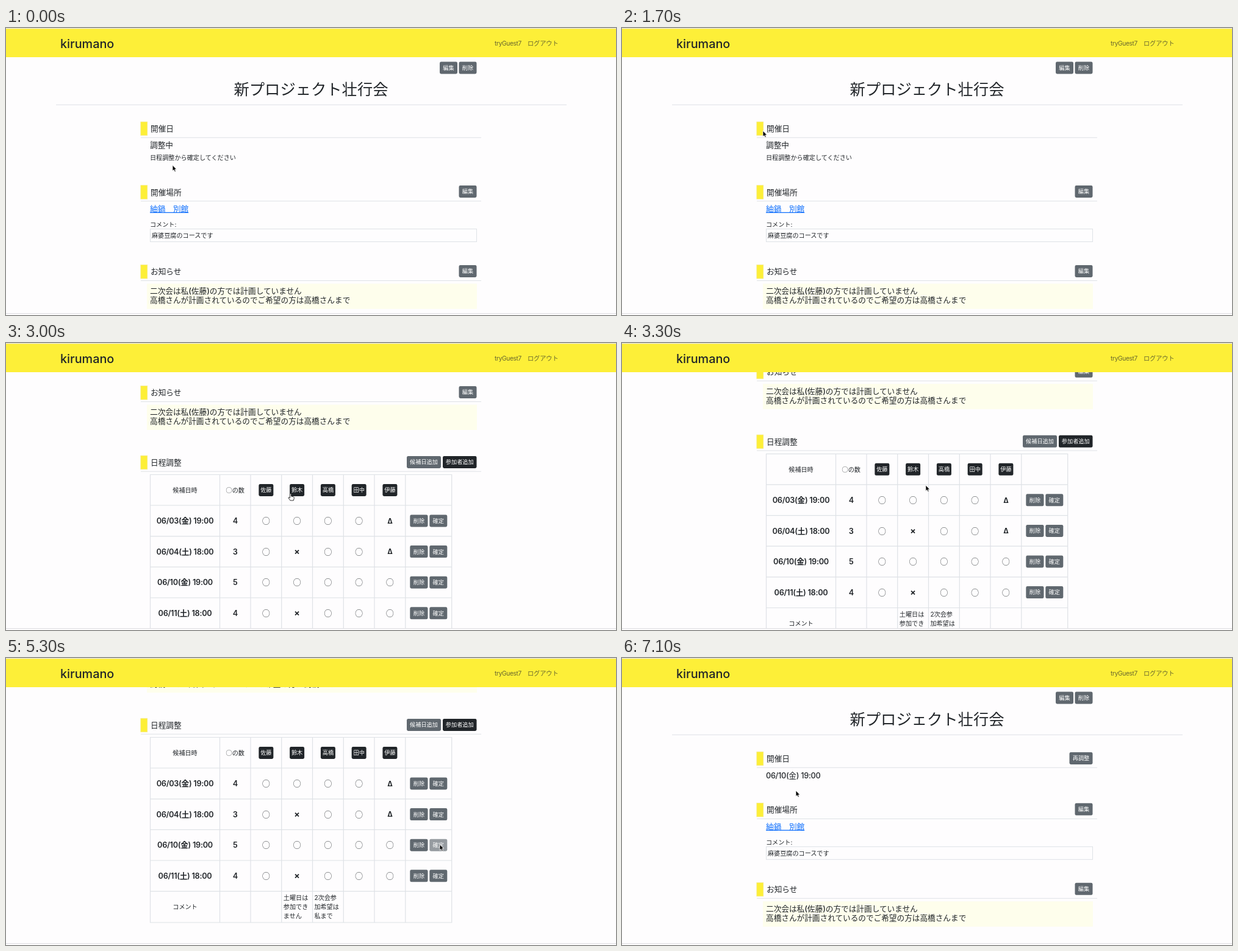
An HTML page that plays this animation: 1000x472 px, repeating every 7200 ms.

```html
<!DOCTYPE html>
<html lang="ja">
<meta charset="utf-8">
<title>日程調整</title>
<style>
html, body { margin: 0; width: 100%; height: 100%; overflow: hidden; background: #fefdfe }
svg { display: block; width: 100%; height: 100% }
text { font-family: Inter, "Noto Sans CJK JP", "Noto Sans CJK", sans-serif; white-space: pre }
.ring { font-family: "Noto Sans CJK JP", "Noto Sans CJK", sans-serif }
</style>
<svg id="stage" viewBox="0 0 1000 472"></svg>
<script>
const INK = '#212529', GRAY = '#60686f', LINE = '#dee2e6', YELLOW = '#fdef38';
const S = 10.12, M = 12.65;

const rect = (x, y, w, h, fill, more = '') =>
  `<rect x="${x}" y="${y}" width="${w}" height="${h}" fill="${fill}" ${more}/>`;
// Text is placed by its vertical middle.
const text = (s, x, mid, size = M, more = '') =>
  `<text x="${x}" y="${mid + size * .37}" font-size="${size}" fill="${INK}" ${more}>${s}</text>`;
const centered = (s, x, mid, size, more = '') => text(s, x, mid, size, 'text-anchor="middle" ' + more);
const rule = (x1, x2, y) => rect(x1, y - .5, x2 - x1, 1, LINE);
const button = (s, x, w, mid, fill = GRAY, id = '') =>
  `<g ${id && `id="${id}"`}>` + rect(x, mid - 10, w, 20, fill, 'rx="2.4"') +
  centered(s, x + w / 2, mid, 9.2, 'style="fill:#fff" font-weight="500"') + '</g>';
const heading = (s, mid) =>
  rect(220.8, mid - 11.3, 11, 22.6, YELLOW, 'stroke="#f3ea98" stroke-width=".7"') +
  text(s, 237, mid) + rule(221, 779, mid + 14.7);

const title = () =>
  button('編集', 711, 29, 65.5) + button('削除', 742.5, 29, 65.5) +
  centered('新プロジェクト壮行会', 500, 100.5, 25.3) +
  rule(82, 919, 126.3) + heading('開催日', 165.5);

const details = () =>
  heading('開催場所', 270) + button('編集', 742.5, 29, 269) +
  text('紬鍋　別館', 236, 297.2, M, 'style="fill:#0d6efd" text-decoration="underline"') +
  text('コメント:', 236, 323, S) +
  rect(236.5, 330.5, 535, 21, 'none', `stroke="${LINE}"`) +
  text('麻婆豆腐のコースです', 239, 341.2, S) +
  heading('お知らせ', 400.8) + button('編集', 742.5, 29, 400) +
  rect(231, 420.5, 541, 41.5, '#fefeec') +
  text('二次会は私(佐藤)の方では計画していません', 236, 432.6, M, 'font-weight="500"') +
  text('高橋さんが計画されているのでご希望の方は高橋さんまで', 236, 447.7, M, 'font-weight="500"');

function schedule() {
  const xs = [236.5, 350.5, 401, 451.7, 502.5, 553.3, 604, 654.8, 730.7];
  const ys = [535.5, 586, 636.8, 687.4, 738, 788.7, 840];
  const mid = c => (xs[c] + xs[c + 1]) / 2;
  const bold = 'font-weight="600" letter-spacing="-.25"';
  const marks = { '◯': [M, 'class="ring"'], '×': [14, 'font-weight="700"'], 'Δ': [11.5, 'font-weight="700"'] };
  let out = heading('日程調整', 515.5) +
    button('候補日追加', 657, 56, 515) + button('参加者追加', 716, 55.5, 515, INK);
  out += `<path d="${xs.map(x => `M${x} 535V840.5`).join('')}${ys.map(y => `M236 ${y}H731`).join('')}"
    stroke="${LINE}" stroke-width="1.2"/>`;
  out += centered('候補日時', mid(0), 561, S) + centered('◯の数', mid(1), 561, S, 'class="ring"');
  ['佐藤', '鈴木', '高橋', '田中', '伊藤'].forEach((n, i) =>
    out += button(n, mid(i + 2) - 12, 24, 561, INK));
  const rows = [['06/03(金) 19:00', 4, '◯◯◯◯Δ'], ['06/04(土) 18:00', 3, '◯×◯◯Δ'],
                ['06/10(金) 19:00', 5, '◯◯◯◯◯'], ['06/11(土) 18:00', 4, '◯×◯◯◯']];
  rows.forEach(([day, count, answers], r) => {
    const y = 611.5 + r * 50.6;
    out += centered(day, mid(0), y, M, bold) + centered(count, mid(1), y, M, bold);
    [...answers].forEach((m, i) => out += centered(m, mid(i + 2), y, ...marks[m]));
    out += button('削除', 662.3, 29.2, y) + button('確定', 694.3, 29, y, GRAY, 'fix' + r);
  });
  out += centered('コメント', mid(0), 814, S);
  [['土曜日は', '参加でき', 'ません'], ['2次会参', '加希望は', '私まで']].forEach((lines, c) =>
    lines.forEach((s, i) => out += text(s, 454.8 + c * 50.6, 799.2 + i * 15.2, S)));
  return out;
}

stage.innerHTML =
  `<g id="open">${title()}${text('調整中', 236, 192.7)}
    ${text('日程調整から確定してください', 236, 213.2, S)}${details()}${schedule()}</g>
  <g id="fixed">${title()}${button('再調整', 733.5, 38, 165)}
    ${text('06/10(金) 19:00', 236, 193, M, 'font-weight="500" letter-spacing="-.25"')}
    <g transform="translate(0 -20.2)">${details()}</g></g>` +
  rect(0, 0, 1000, 48, YELLOW) + rect(0, 0, 1000, 1.2, '#e9e8ec') +
  text('kirumano', 89, 25.5, 19.8, 'font-weight="500"') +
  text('tryGuest7', 801, 24.8, S, 'fill-opacity=".68" letter-spacing="-.3"') +
  text('ログアウト', 855, 24.8, S, 'fill-opacity=".68"') +
  rect(0, 469, 1000, 3, '#fefdfe') + rect(0, 469, 1000, 1, '#dcdce0') +
  `<g id="status">${rect(-2, 457, 336, 17, '#ececef', 'rx="2" stroke="#d4d4d8" stroke-width=".8"')}
    ${text('リクエストを処理しています…', 0, 464, 7.4, 'fill-opacity=".6"')}</g>
  <g id="cursor">
    <path id="arrow" d="M0 0V9.6L2.2 7.7 3.7 11 5.3 10.3 3.9 7.1H6.7Z" stroke="#fff" stroke-width=".8"/>
    <path id="hand" d="M-1 1Q0-.5 1 1V4.5L5 5.5Q6.2 6 5.8 8L4.8 11.5H-.5L-3.5 7.5Q-3.6 6-2.4 6.3L-1 7.5Z"
      fill="#fff" stroke="#222" stroke-width=".9" stroke-linejoin="round"/>
  </g>`;

const $ = id => document.getElementById(id);
const show = (id, on) => $(id).setAttribute('visibility', on ? 'visible' : 'hidden');
const opacity = (id, v) => $(id).setAttribute('opacity', v);
const move = (id, x, y) => $(id).setAttribute('transform', `translate(${x} ${y})`);

// Eased value between keys of the form [time, ...values].
function at(keys, t) {
  const i = keys.findIndex(k => k[0] > t);
  if (i < 1) return keys.at(i).slice(1);
  const a = keys[i - 1], b = keys[i];
  let u = (t - a[0]) / (b[0] - a[0]);
  u *= u * (3 - 2 * u);
  return a.slice(1).map((v, j) => v + (b[j + 1] - v) * u);
}

const scrollKeys = [[0, 0], [1900, 0], [2700, 319], [3150, 319], [3500, 405], [7200, 405]];
const cursorKeys = [[0, 273, 225.5], [600, 262, 215], [1500, 231, 169], [1900, 231, 169],
  [2900, 466.5, 247.5], [3100, 466.5, 247.5], [3600, 555, 209], [4100, 640, 255], [4800, 711, 306.5],
  [5400, 711, 306.5], [5800, 649, 268], [6800, 285, 218], [7200, 285, 218]];

function draw(now) {
  const t = now % 7200, done = t >= 5500;
  show('open', !done);
  show('fixed', done);
  move('open', 0, -at(scrollKeys, t)[0]);
  opacity('fix2', t >= 5200 && !done ? .65 : 1);
  opacity('status', t < 5350 ? 0 : at([[0, 1], [5600, 1], [6000, 0], [7200, 0]], t)[0]);
  move('cursor', ...at(cursorKeys, t));
  const pointing = t > 2850 && t < 3200 || t > 4650 && t < 5200;
  show('hand', pointing);
  show('arrow', !pointing);
  requestAnimationFrame(draw);
}
requestAnimationFrame(draw);
</script>
</html>
```
